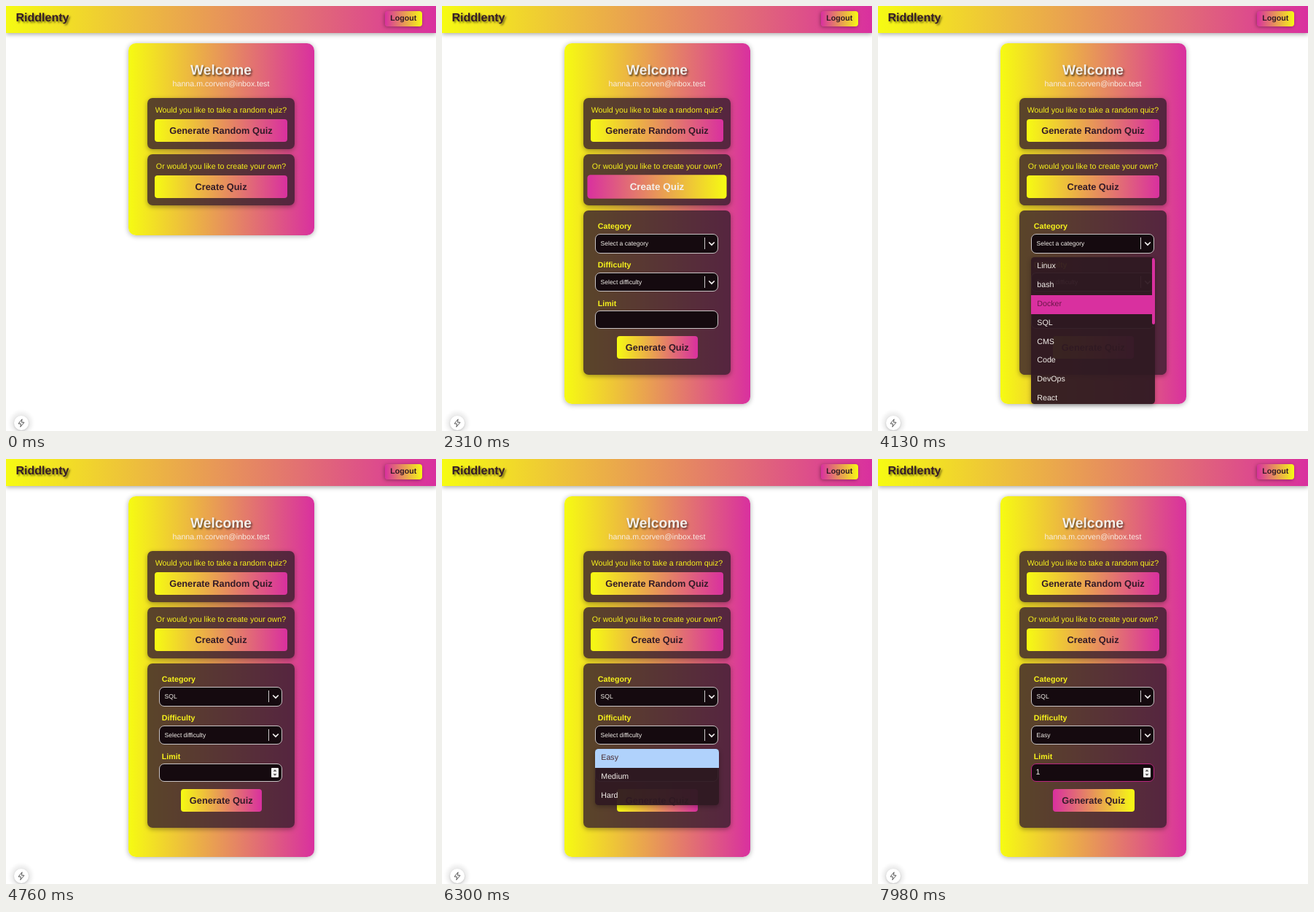
Animation, 590 px wide and 582 px high, one loop 8 s. Source, as an HTML page:

```html
<!DOCTYPE html>
<html lang="en">
<head>
<meta charset="utf-8">
<title>Quiz builder</title>
<style>
:root { --yellow: #f6fb12; --pink: #d9309f; --dark: #331a28; --light: #f3efea; }
html, body { margin: 0; width: 100%; height: 100%; overflow: hidden; background: #fff; }
body { position: relative; font: 10.67px/20px "Liberation Sans", Arial, sans-serif; text-rendering: geometricPrecision; }
div, svg { position: absolute; box-sizing: border-box; white-space: nowrap; }
b { font-weight: bold; }
header, .card, .btn { background: linear-gradient(to right, var(--yellow), var(--pink)); }
header { position: absolute; width: 590px; height: 37px; box-shadow: 0 2px 6px rgba(0,0,0,.32); }
.title { left: 13.5px; top: 7px; font-size: 16px; font-weight: bold; color: var(--dark); text-shadow: 2px 2px 2.5px rgba(0,0,0,.5); }
.card { left: 168px; top: 51px; width: 254.5px; border-radius: 10px; box-shadow: 0 1px 7px rgba(0,0,0,.32); }
.mid { left: 168px; width: 254px; text-align: center; }
.panel { left: 194px; width: 202px; border-radius: 7px; background: rgba(53,29,44,.8); box-shadow: 0 2px 6px rgba(0,0,0,.35); }
.ask { left: 0; top: 6.5px; width: 202px; text-align: center; color: #f7f01c; }
.btn { border-radius: 4px; color: var(--dark); font-weight: bold; font-size: 12.8px; line-height: 31px; height: 31px; text-align: center; }
.wide { left: 10px; top: 29px; width: 182px; }
.btn.hot { background: linear-gradient(to left, var(--yellow), var(--pink)); }
.label { left: 19.8px; color: #f7f31c; font-weight: bold; }
.field { --p: 0%; left: 16.4px; width: 169px; height: 26.5px; border-radius: 7px; background: #150a0f; color: var(--light);
  font-size: 8.53px; line-height: 24.5px; padding-left: 6.2px; border: 1px solid color-mix(in srgb, #b9267f var(--p), #c9c4c5); }
.field i { position: absolute; left: 149px; top: 4px; width: 1px; height: 16px; background: #cfcacb; }
.field svg { left: 153px; top: 7px; width: 12px; height: 12px; fill: none; stroke-width: 1.7; stroke-linecap: round;
  stroke: color-mix(in srgb, var(--pink) var(--p), #f4f0f0); }
.menu { left: 210.3px; width: 169.4px; overflow: hidden; border-radius: 4.5px; background: rgba(48,26,34,.95); box-shadow: 0 2px 6px rgba(0,0,0,.3); color: var(--light); }
.menu div { position: static; height: 25.9px; line-height: 25.9px; padding-left: 8px; }
.menu .focus { background: var(--pink); color: #6a1748; }
.menu .press { background: #b0d2fc; color: #4a2b30; }
.menu u { position: absolute; right: 0; top: 1px; width: 4px; height: 91px; border-radius: 2px; background: var(--pink); }
.badge { left: 10.5px; top: 560.5px; width: 20px; height: 20px; border-radius: 50%; background: #fff; box-shadow: 0 0 5px 5px rgba(0,0,0,.075), 0 1px 3px rgba(0,0,0,.18); }
</style>
</head>
<body>
<header>
  <div class="title">Riddlenty</div>
  <div class="btn hot" style="left:520px;top:7px;width:50.5px;height:20.5px;line-height:20.5px;font-size:10.67px;box-shadow:-1px 1px 5px rgba(0,0,0,.35)">Logout</div>
</header>
<div class="card" id="card"></div>
<div class="mid" style="top:79px;font-size:19.2px;font-weight:bold;color:var(--light);text-shadow:1.5px 1.5px 2.5px rgba(0,0,0,.6)">Welcome</div>
<div class="mid" style="top:96.5px;color:#f8ece4">hanna.m.corven@inbox.test</div>

<div class="panel" style="top:126px;height:70px">
  <div class="ask">Would you like to take a random quiz?</div>
  <div class="btn wide">Generate Random Quiz</div>
</div>
<div class="panel" style="top:203px;height:70px">
  <div class="ask">Or would you like to create your own?</div>
  <div class="btn wide" id="create">Create Quiz</div>
</div>
<div class="panel" id="form" style="top:280px;height:225px">
  <div class="label" style="top:12.3px">Category</div>
  <div class="field" id="category" style="top:32px"><span></span><i></i><svg><path d="M2.7 4 6 7.2 9.3 4"/></svg></div>
  <div class="label" style="top:65px">Difficulty</div>
  <div class="field" id="difficulty" style="top:84.7px"><span></span><i></i><svg><path d="M2.7 4 6 7.2 9.3 4"/></svg></div>
  <div class="label" style="top:118px">Limit</div>
  <div class="field" id="limit" style="top:137px;height:24.5px;line-height:22.5px;font-size:10.67px;padding-left:5px"><span></span></div>
  <svg id="spinner" style="left:170px;top:142.5px" width="10" height="13">
    <rect width="10" height="13" rx="1" fill="#efefef"/>
    <path d="M2.6 4.8 5 2.2 7.4 4.8zM2.6 8.2 5 10.8 7.4 8.2z" fill="#4a4446"/>
  </svg>
  <div class="btn" id="generate" style="left:45.5px;top:171.5px;width:111.5px">Generate Quiz</div>
</div>
<div class="menu" id="topics" style="top:344px;height:201px"></div>
<div class="menu" id="levels" style="top:396.8px;height:77.7px"></div>
<div class="badge"><svg width="20" height="20" fill="none" stroke="#555" stroke-width="1" stroke-linejoin="round"><path d="M11 4.8 6 11h3.4L8.8 15.4 14 9.2h-3.5z"/></svg></div>

<script>
const LOOP = 8000;
const $ = id => document.getElementById(id);
const ramp = (t, start, length) => {
  const x = Math.min(1, Math.max(0, (t - start) / length));
  return x * x * (3 - 2 * x);
};
const within = (t, from, to) => t >= from && t < to;
const show = (id, on) => $(id).style.display = on ? '' : 'none';

function fillMenu(id, names) {
  $(id).innerHTML = names.map(name => `<div>${name}</div>`).join('');
}
fillMenu('topics', ['Linux', 'bash', 'Docker', 'SQL', 'CMS', 'Code', 'DevOps', 'React']);
fillMenu('levels', ['Easy', 'Medium', 'Hard']);
$('topics').append(document.createElement('u'));

function hoverButton(id, t, from, to) {
  const on = ramp(t, from - 20, 350) - ramp(t, to - 20, 300), el = $(id);
  el.classList.toggle('hot', within(t, from, to));
  el.style.transform = `scale(${1 + 0.05 * on})`;
  el.style.color = `color-mix(in srgb, var(--light) ${on * 100}%, var(--dark))`;
}

function field(id, text, glow) {
  $(id).firstChild.textContent = text;
  $(id).style.setProperty('--p', glow * 100 + '%');
}

function menu(id, open, active, pressed) {
  show(id, open);
  [...$(id).querySelectorAll('div')].forEach((row, i) =>
    row.className = i !== active ? '' : pressed ? 'press' : 'focus');
}

function render(t) {
  const expanded = t >= 2310;
  $('card').style.height = (expanded ? 494 : 262.5) + 'px';
  show('form', expanded);

  hoverButton('create', t, 1470, 3010);
  hoverButton('generate', t, 7980, 9000);

  field('category', t < 4690 ? 'Select a category' : 'SQL', ramp(t, 3180, 100) - ramp(t, 3690, 100));
  field('difficulty', t < 6370 ? 'Select difficulty' : 'Easy', ramp(t, 5430, 100) - ramp(t, 5860, 130));
  field('limit', t < 7700 ? '' : '1', t < 7140 ? 0 : 1);
  show('spinner', within(t, 4760, 4970) || t >= 6650);

  const topic = [3920, 4130, 4340].filter(time => t >= time).length;
  menu('topics', within(t, 3430, 4690), topic, t >= 4620);
  menu('levels', within(t, 5670, 6370), 0, t >= 6300);
}

function tick() {
  render(performance.now() % LOOP);
  requestAnimationFrame(tick);
}
tick();
</script>
</body>
</html>
```
